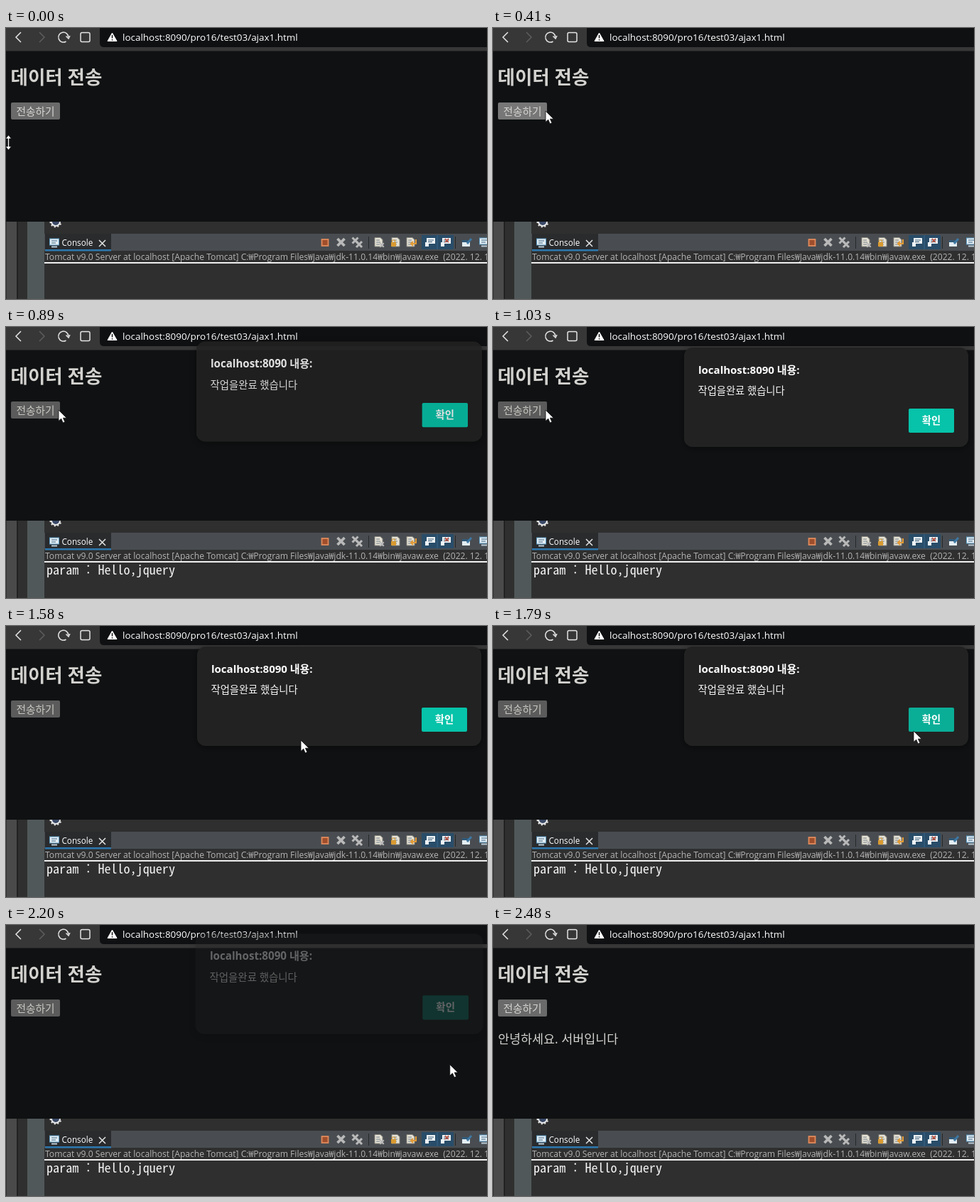
An HTML page for the animation above (2.76 s loop, 677 px wide and 382 px high).

```html
<!DOCTYPE html>
<html lang="ko">
<head>
<meta charset="utf-8">
<title>Ajax demo</title>
<style>
  html, body { margin: 0; width: 100%; height: 100%; overflow: hidden; background: #0f1112; }
  svg { display: block; }
  text { font-family: "Open Sans", "Noto Sans CJK KR", sans-serif; white-space: pre; }
  #param { font-family: "Noto Sans Mono CJK KR", "Noto Sans Mono", monospace; }
  .line { fill: none; stroke: #e4e4e4; stroke-width: 1.5; }
</style>
</head>
<body>
<svg width="677" height="382" viewBox="0 0 677 382">
  <defs>
    <g id="screen">
      <rect x="-6.5" y="-6" width="13" height="9" fill="#e3edf3" stroke="#5f9cc4"/>
      <path d="M-4-3H4M-4 0H2" stroke="#3d6685"/>
      <path d="M-4 5.5H4" stroke="#b9c9d4" stroke-width="2"/>
    </g>
    <g id="output">
      <path d="M-5-6H7V2H-2V6H-7V0H-5Z" fill="#eef3f6"/>
      <path d="M-3-3H5M-3-.5H3" stroke="#31546e"/>
    </g>
    <g id="sheet">
      <path d="M-6-6.5H2L5-3.5V6H-6Z" fill="#e6e2d5" stroke="#8d8d85"/>
      <path d="M-4-3H1M-4 0H2M-4 3H1" stroke="#6f7d86"/>
    </g>
    <path id="cross" d="M-5-5 5 5M5-5-5 5" stroke="#b9b9b9" stroke-width="3.800"/>
    <filter id="shadow" x="-10%" y="-20%" width="120%" height="150%">
      <feDropShadow dx="0" dy="2" stdDeviation="5" flood-color="#000" flood-opacity=".4"/>
    </filter>
  </defs>

  <!-- browser -->
  <rect width="677" height="273" fill="#0f1112"/>
  <rect width="677" height="32.500" fill="#373737"/>
  <path d="M132 0H677V27H138Q132 27 132 21Z" fill="#0f1012"/>
  <path class="line" d="M21 6 14 13 21 20"/>
  <path class="line" d="M47 6 54 13 47 20" style="stroke:#5d5d5d"/>
  <path class="line" d="M84.500 19A7 7 0 1 1 87.800 13M84.500 11.500 88 15 90 11"/>
  <rect class="line" x="105" y="6.500" width="13" height="13" rx="2"/>
  <path d="M149.500 7 156 18.500H143Z" fill="#fff" stroke="#fff" stroke-linejoin="round"/>
  <path d="M149.500 10V14.500M149.500 16V17.500" stroke="#111" stroke-width="1.500"/>
  <text x="164" y="18" font-size="13.440" fill="#fff">localhost:8090/pro16/test03/ajax1.html</text>
  <text x="6.500" y="78.500" font-size="26.500" font-weight="700" fill="#d3d2cf">데이터 전송</text>
  <rect id="send" x="7" y="105" width="69" height="24" rx="2"/>
  <text id="sendLabel" x="41.500" y="122.700" font-size="14.700" text-anchor="middle">전송하기</text>
  <text id="reply" x="7" y="167" font-size="17.400" fill="#d3d2cf">안녕하세요. 서버입니다</text>

  <!-- console -->
  <rect y="273" width="677" height="109" fill="#2f2f2f"/>
  <rect x="1" y="273" width="14" height="109" fill="#4a4a4a"/>
  <rect x="15" y="273" width="2" height="109" fill="#222"/>
  <rect x="30" y="273" width="24" height="109" fill="#51585a"/>
  <path d="M64 273A6 6 0 0 0 76 273" fill="#3b4a68" stroke="#e8e8e8" stroke-width="2"/>
  <path d="M62.500 273A7.500 7.500 0 0 0 77.500 273" fill="none" stroke="#e8e8e8" stroke-width="2" stroke-dasharray="2 2.700"/>
  <rect x="54" y="290" width="623" height="24" fill="#494d51"/>
  <rect x="55" y="290" width="93" height="24" fill="#292b2d"/>
  <rect x="55" y="312" width="93" height="2.500" fill="#2d78ae"/>
  <use href="#screen" x="68" y="303"/>
  <text x="78.500" y="306.500" font-size="11.700" fill="#fff">Console</text>
  <path class="line" d="M131 299 140 308M140 299 131 308"/>
  <rect x="444.500" y="298" width="9" height="9" fill="#a04f2c" stroke="#e08a5c" stroke-width="1.800"/>
  <use href="#cross" x="471.500" y="302"/>
  <use href="#cross" transform="translate(491.500 299.500) scale(.8)"/>
  <use href="#cross" transform="translate(497 305) scale(.8)"/>
  <path d="M510.500 294V311M632.500 294V311" stroke="#25282a"/>
  <rect x="585" y="292" width="45" height="20" fill="#294d69"/>
  <path d="M607 292V312" stroke="#38678a"/>
  <use href="#sheet" x="525" y="302"/>
  <use href="#cross" transform="translate(529 306) scale(.55)"/>
  <use href="#sheet" x="549" y="302"/>
  <rect x="542" y="302" width="7" height="6" fill="#d99a31"/>
  <path d="M543.500 302V299H547.500V302" fill="none" stroke="#d99a31"/>
  <use href="#sheet" x="570" y="302"/>
  <path d="M577 298V304H570M573 301 570 304 573 307" fill="none" stroke="#e29a35" stroke-width="2"/>
  <use href="#output" x="597" y="302"/>
  <use href="#output" x="619" y="302"/>
  <path d="M618 297 623 302M623 297 618 302" stroke="#c34a36" stroke-width="1.500"/>
  <rect x="642" y="299" width="11" height="9" fill="#e3edf3"/>
  <path d="M642 300.500H653" stroke="#315a79" stroke-width="3"/>
  <path d="M649 304 655 297" stroke="#3f78a3" stroke-width="3"/>
  <use href="#screen" x="673" y="302"/>
  <text x="55" y="326.700" font-size="12.130" fill="#b4b4b4">Tomcat v9.0 Server at localhost [Apache Tomcat] C:₩Program Files₩Java₩jdk-11.0.14₩bin₩javaw.exe  (2022. 12. 1</text>
  <rect x="54" y="330" width="623" height="2" fill="#f0f0f0"/>
  <text id="param" x="57" y="349" font-size="18.100" fill="#f4f4f4">param : Hello,jquery</text>

  <g id="dialog">
    <rect x="269" y="29" width="400" height="140" rx="12" fill="#222322" filter="url(#shadow)"/>
    <text x="289" y="65.500" font-size="15" font-weight="700" fill="#fff">localhost:8090 내용:</text>
    <text x="288.500" y="95" font-size="14.300" fill="#f4f4f4">작업을완료 했습니다</text>
    <rect id="ok" x="585" y="115" width="64" height="34" rx="2"/>
    <text x="617" y="136.500" font-size="14.300" font-weight="700" text-anchor="middle" fill="#fff">확인</text>
  </g>

  <circle id="ripple" r="12" fill="#c4d62c" opacity=".6"/>
  <path id="arrow" d="M0 0V15.500L3.700 12.200 6.200 18 8.900 16.800 6.400 11.200H11.300Z" fill="#fff" stroke="#111" stroke-width=".8"/>
  <path id="resize" d="M3.500 151 7.500 156H4.500V167H7.500L3.500 172-.5 167H2.500V156H-.5Z" fill="#fff" stroke="#111" stroke-width=".7"/>
</svg>
<script>
const LOOP = 2760, STEP = 69;
const el = id => document.getElementById(id);
const show = (id, on) => el(id).setAttribute("visibility", on ? "visible" : "hidden");
const set = (id, name, value) => el(id).setAttribute(name, value);

// [step, x, y]
const pointer = [
  [0, 3, 161], [3, 52, 158], [5, 84, 141], [6, 74, 117], [19, 74, 117],
  [20, 110, 122], [21, 200, 137], [22, 312, 152], [23, 415, 161],
  [24, 500, 158], [25, 566, 151], [27, 618, 145], [31, 618, 145], [35, 645, 352]
];
// [step, lift, opacity]
const alertBox = [
  [11, 22, 0], [12, 18, .45], [13, 8, .87], [14, 2, .97], [15, 0, 1],
  [30, 0, 1], [31, 5, .8], [32, 16, .35], [33, 22, 0]
];

function at(keys, s) {
  if (s <= keys[0][0]) return keys[0].slice(1);
  const i = keys.findIndex(k => k[0] >= s);
  if (i < 0) return keys.at(-1).slice(1);
  const a = keys[i - 1], b = keys[i], p = (s - a[0]) / (b[0] - a[0]);
  return a.slice(1).map((v, j) => v + (b[j + 1] - v) * p);
}

function draw(t) {
  const s = Math.min(39, Math.floor((t + 10) / STEP));
  const within = (from, to) => s >= from && s < to;

  const [x, y] = at(pointer, s);
  set("arrow", "transform", `translate(${x} ${y})`);
  show("arrow", within(1, 36));
  show("resize", s === 0);
  set("ripple", "cx", x - 1);
  set("ripple", "cy", y - 1);
  show("ripple", within(8, 10) || within(28, 31));

  const waiting = within(8, 33);
  set("send", "fill", waiting ? "#5b5b5b" : within(5, 8) ? "#777" : "#6a6a6a");
  set("sendLabel", "fill", waiting ? "#c9c8c2" : "#d6d5d2");

  const [lift, opacity] = at(alertBox, s);
  const scale = 1 + lift * .0007;
  set("dialog", "transform", `translate(469 ${99 - lift}) scale(${scale}) translate(-469 -99)`);
  set("dialog", "opacity", opacity);
  set("ok", "fill", s >= 28 ? "#15776a" : s >= 26 ? "#0aae97" : "#06c3a9");

  show("param", s >= 11);
  show("reply", s >= 33);
}

const start = performance.now();
function tick() {
  draw((performance.now() - start) % LOOP);
  requestAnimationFrame(tick);
}
tick();
</script>
</body>
</html>
```
